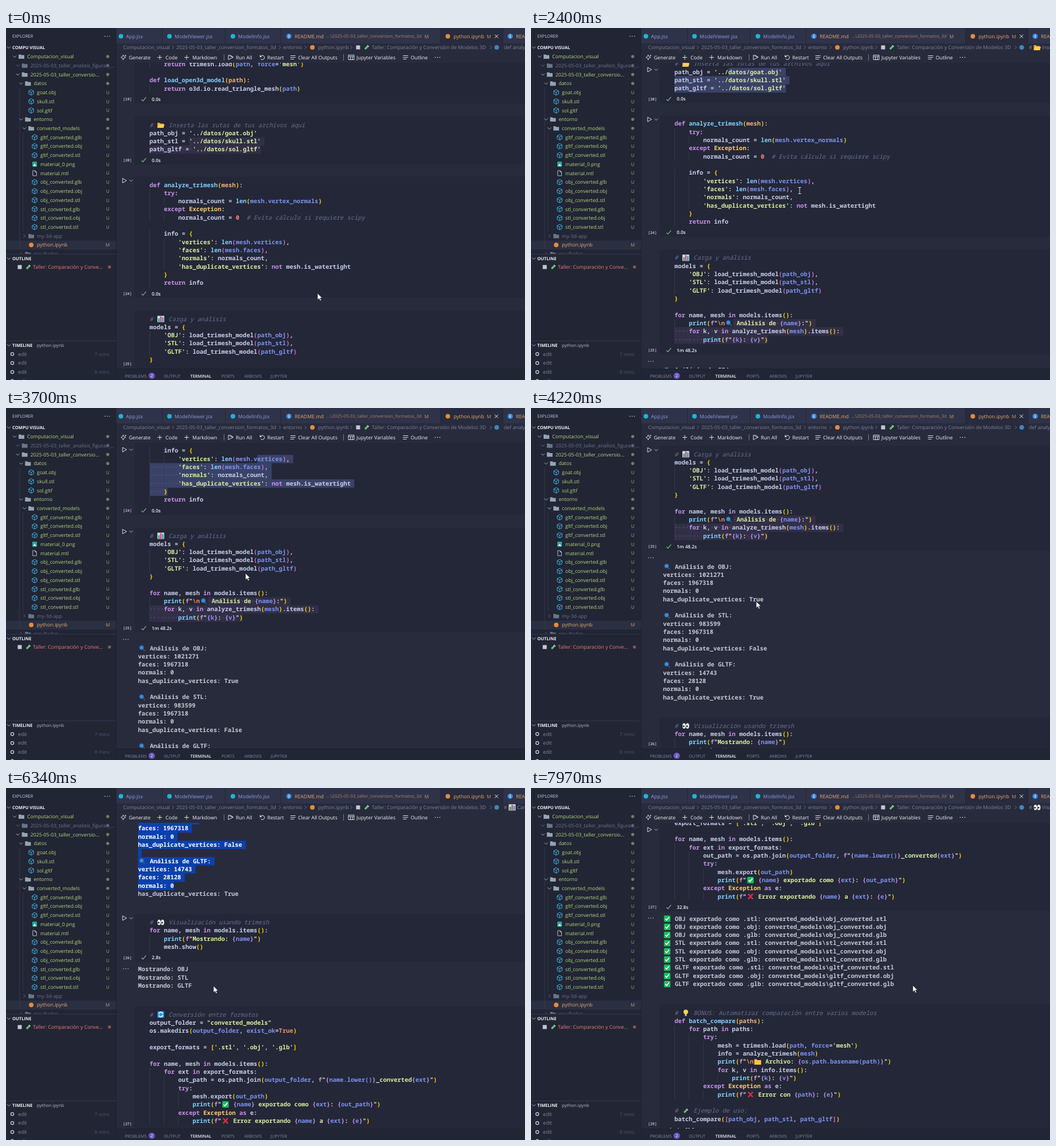
An HTML page that plays this animation: 908 by 617 pixels, repeating every 8 s.

```html
<!DOCTYPE html>
<html lang="es">
<head>
<meta charset="utf-8">
<title>Notebook</title>
<style>
html, body { margin: 0; width: 100%; height: 100%; overflow: hidden; background: #282b3c; }
svg { display: block; width: 908px; height: 617px; text-rendering: geometricPrecision; }
text { white-space: pre; font-family: "Open Sans", "Noto Sans", sans-serif; }
.code text { font: 600 10.48px "Noto Sans Mono", "DejaVu Sans Mono", monospace; }
.code .i { font-style: italic; font-weight: 500; }
.code .ui { font: 600 8.2px "Open Sans", sans-serif; }
.code .num { font: 600 6.5px "Noto Sans Mono", monospace; }
</style>
</head>
<body>
<svg id="stage" viewBox="0 0 908 617"></svg>
<script>
const CHAR = 6.288, LINE = 14.33, EMOJI = 14.5, CODE_X = 251, OUT_X = 231, NOTCH = 35.75, LOOP = 8000, HOLD = 100;
const C = {
  text: '#c6cce9', key: '#c792ea', fn: '#82cfff', str: '#d7eea0', arg: '#7b92f0', param: '#f0b084',
  note: '#676e95', num: '#f78c6c', type: '#ffcb6b', out: '#c6c8d2', green: '#b3d67d', orange: '#e2a86e',
  dim: '#6d728f', white: '#f0f1f8', cyan: '#3db4e6', line: '#3a3e55',
  pairs: ['#ffd700', '#da70d6', '#5aa8ff']
};

// ---------- drawing helpers ----------
const text = (x, y, s, fill = C.text, size = 8.75, extra = '') =>
  `<text x="${x}" y="${y + size * .36}" font-size="${size}" fill="${fill}" ${extra}>${s}</text>`;
const rect = (x, y, w, h, fill, extra = '') =>
  `<rect x="${x}" y="${y}" width="${w}" height="${h}" fill="${fill}" ${extra}/>`;
const dot = (x, y, r, fill, extra = '') => `<circle cx="${x}" cy="${y}" r="${r}" fill="${fill}" ${extra}/>`;
const path = (x, y, d, stroke, fill = 'none', w = 1) =>
  `<path transform="translate(${x} ${y})" d="${d}" stroke="${stroke}" fill="${fill}" stroke-width="${w}"/>`;
const down = (x, y, c = '#b9bccd') => path(x, y, 'M-3-1.5L0 1.5 3-1.5', c, 'none', .9);
const right = (x, y, c = C.dim) => path(x, y, 'M-1.5-3L1.5 0-1.5 3', c, 'none', .9);
const folder = (x, y, c = '#93a5b3') => path(x, y, 'M-5-3.6h4l1.2 1.2H5V4H-5z', 'none', c);
const cube = (x, y) => path(x, y, 'M0-4.8L4.2-2.5V2.5L0 4.8-4.2 2.5V-2.5zM-4.2-2.5L0 0 4.2-2.5M0 0V4.8', C.cyan);
const plus = (x, y) => path(x, y, 'M-4 0H4M0-4V4', C.white, 'none', .9);
const square = (x, y, c) => rect(x - 3.5, y - 3.5, 7, 7, c);
const info = (x, y) => dot(x, y, 4.6, '#3b8ee0') + rect(x - .6, y - 1, 1.2, 3.4, '#fff') + rect(x - .6, y - 2.8, 1.2, 1.2, '#fff');
const tube = (x, y) => path(x, y, 'M-3 3L3-3', '#62c46b', 'none', 3.2) + path(x, y, 'M1-4L4-1', '#dfe8e8');

const emoji = {
  '📂': (x, y) => path(x, y, 'M-6-4h4l1.5 1.5H5V5H-6z', 'none', '#e0a92e') + path(x, y, 'M-4-1H6.5L4.5 5H-6z', 'none', '#ffd054'),
  '📁': (x, y) => path(x, y, 'M-6-4.5h4l1.5 1.5H6V5H-6z', 'none', '#fcc43a'),
  '📊': (x, y) => rect(x - 6, y - 5.5, 12, 11, '#cfdbe4') + rect(x - 4.5, y - 1, 2.5, 6, '#2fa66a') + rect(x - 1.2, y - 4.5, 2.5, 9.5, '#e0475b') + rect(x + 2.2, y - 3, 2.5, 8, '#3b8ee0'),
  '🔍': (x, y) => path(x, y, 'M1.5 1.5L5 5', '#35506e', 'none', 2.2) + dot(x - 1, y - 1, 3.7, '#3a8fdc', 'stroke="#29598f" stroke-width="1.3"'),
  '👀': (x, y) => [-3, 3].map(d => `<ellipse cx="${x + d}" cy="${y}" rx="2.9" ry="4.8" fill="#f4f4f4"/>` + dot(x + d - .8, y + .5, 1.6, '#2a2a33')).join(''),
  '🔄': (x, y) => rect(x - 5.8, y - 5.8, 11.6, 11.6, '#2c9be8', 'rx="1.5"') + path(x, y, 'M-3-.5A3 3 0 0 1 3-1.5M3 .5A3 3 0 0 1-3 1.5', '#fff', 'none', 1.4),
  '✅': (x, y) => rect(x - 5.6, y - 5.6, 11.2, 11.2, '#16c160', 'rx="1.5"') + path(x, y, 'M-3.2 0L-1 2.6 3.4-2.8', '#fff', 'none', 1.6),
  '❌': (x, y) => path(x, y, 'M-4-4.5L4 4.5M4-4.5L-4 4.5', '#e5293e', 'none', 2.4),
  '💡': (x, y) => dot(x, y - 1.5, 4, '#ffd54a') + rect(x - 1.7, y + 2, 3.4, 3.6, '#b9bcc4'),
  '🧪': tube
};
const isEmoji = ch => ch in emoji;
const advance = s => [...s].reduce((w, ch) => w + (isEmoji(ch) ? EMOJI : CHAR), 0);

// Lays out coloured runs on the character grid, emoji being wider cells.
function layout(x, y, runs) {
  let svg = '';
  for (const [s, fill, cls = ''] of runs)
    for (const part of s.split(/([📂📁📊🔍👀🔄✅❌💡🧪])/u)) {
      if (isEmoji(part)) svg += emoji[part](x + EMOJI / 2, y);
      else if (part.trim()) svg += `<text class="${cls}" x="${x}" y="${y + 3.5}" fill="${fill}">${part}</text>`;
      x += advance(part);
    }
  return svg;
}

// ---------- syntax colours ----------
function highlight(src, stack) {
  const runs = [], isDef = src.startsWith('def');
  const token = /(#.*)|(f?"(?:\\.|[^"])*"|'[^']*')|\b(def|return|try|except|for|in|as|not)\b|\b(Exception)\b|\b(True|\d+)\b|([A-Za-z_][\w.]*)|(.)/gu;
  let prev = '';
  for (const [s, note, str, key, type, num, word] of src.matchAll(token)) {
    if (note) runs.push([s, C.note, 'i']);
    else if (str) {
      let inside = false;
      for (const p of s.split(/(^f(?=")|[{}]|\\n)/)) {
        if (!p) continue;
        const brace = p === '{' || p === '}';
        if (brace) inside = p === '{';
        runs.push([p, brace || p === 'f' ? C.key : p === '\\n' ? C.num : inside ? C.arg : C.str]);
      }
    }
    else if (key) runs.push([s, C.key]);
    else if (type) runs.push([s, C.type]);
    else if (num) runs.push([s, C.num]);
    else if (word) runs.push([s, prev === 'def' || /^(print|len)$/.test(s) ? C.fn
      : stack.includes('(') ? (isDef ? C.param : C.arg) : C.text]);
    else if ('([{'.includes(s)) { runs.push([s, C.pairs[stack.length % 3]]); stack.push(s); }
    else if (')]}'.includes(s)) { stack.pop(); runs.push([s, C.pairs[stack.length % 3]]); }
    else runs.push([s, C.text]);
    if (s !== ' ') prev = s;
  }
  return runs;
}

// ---------- notebook ----------
const report = (name, vertices, faces, dup) =>
  [`🔍 Análisis de ${name}:`, `vertices: ${vertices}`, `faces: ${faces}`, 'normals: 0', `has_duplicate_vertices: ${dup}`, ''];
const exported = ['OBJ', 'STL', 'GLTF'].flatMap(n => ['stl', 'obj', 'glb'].map(e =>
  `✅ ${n} exportado como .${e}: converted_models\\${n.toLowerCase()}_converted.${e}`));

const cells = [
  { n: 19, y: 49, time: '0.0s', code: String.raw`def load_trimesh_model(path):
    return trimesh.load(path, force='mesh')

def load_open3d_model(path):
    return o3d.io.read_triangle_mesh(path)` },
  { n: 20, y: 170, time: '0.0s', code: String.raw`# 📂 Inserta las rutas de tus archivos aquí
path_obj = '../datos/goat.obj'
path_stl = '../datos/skull.stl'
path_gltf = '../datos/sol.gltf'` },
  { n: 24, y: 275, time: '0.0s', code: String.raw`def analyze_trimesh(mesh):
    try:
        normals_count = len(mesh.vertex_normals)
    except Exception:
        normals_count = 0  # Evita cálculo si requiere scipy

    info = {
        'vertices': len(mesh.vertices),
        'faces': len(mesh.faces),
        'normals': normals_count,
        'has_duplicate_vertices': not mesh.is_watertight
    }
    return info` },
  { n: 25, y: 510, time: '1m 48.2s', outY: 707, dotsY: 691.5,
    out: [...report('OBJ', 1021271, 1967318, 'True'), ...report('STL', 983599, 1967318, 'False'), ...report('GLTF', 14743, 28128, 'True')],
    code: String.raw`# 📊 Carga y análisis
models = {
    'OBJ': load_trimesh_model(path_obj),
    'STL': load_trimesh_model(path_stl),
    'GLTF': load_trimesh_model(path_gltf)
}

for name, mesh in models.items():
    print(f"\n🔍 Análisis de {name}:")
    for k, v in analyze_trimesh(mesh).items():
        print(f"{k}: {v}")` },
  { n: 26, y: 986.3, time: '2.8s', outY: 1068.5, dotsY: 1067.5,
    out: ['OBJ', 'STL', 'GLTF'].map(n => 'Mostrando: ' + n),
    code: String.raw`# 👀 Visualización usando trimesh
for name, mesh in models.items():
    print(f"Mostrando: {name}")
    mesh.show()` },
  { n: 27, y: 1147.8, time: '32.8s', outY: 1373, dotsY: 1372, out: exported,
    code: String.raw`# 🔄 Conversión entre formatos
output_folder = "converted_models"
os.makedirs(output_folder, exist_ok=True)

export_formats = ['.stl', '.obj', '.glb']

for name, mesh in models.items():
    for ext in export_formats:
        out_path = os.path.join(output_folder, f"{name.lower()}_converted{ext}")
        try:
            mesh.export(out_path)
            print(f"✅ {name} exportado como {ext}: {out_path}")
        except Exception as e:
            print(f"❌ Error exportando {name} a {ext}: {e}")` },
  { n: 29, y: 1538, time: '1m 50.8s', code: String.raw`# 💡 BONUS: Automatizar comparación entre varios modelos
def batch_compare(paths):
    for path in paths:
        try:
            mesh = trimesh.load(path, force='mesh')
            info = analyze_trimesh(mesh)
            print(f"\n📁 Archivo: {os.path.basename(path)}")
            for k, v in info.items():
                print(f"{k}: {v}")
        except Exception as e:
            print(f"❌ Error con {path}: {e}")

# 🧪 Ejemplo de uso:
batch_compare([path_obj, path_stl, path_gltf])` }
];

function drawCell(cell) {
  cell.lines = cell.code.split('\n');
  cell.statusY = cell.y + (cell.lines.length - 1) * LINE + 18.6;
  cell.end = cell.out ? cell.outY + cell.out.length * LINE + 14 : cell.statusY + 12;
  const stack = [];
  let svg = rect(225, cell.y - 14.5, 683, cell.statusY - cell.y + 22, '#242737') + `<g id="sel${cell.n}"></g>`;
  cell.lines.forEach((src, i) => {
    const y = cell.y + i * LINE, indent = src.search(/\S/);
    for (let col = 0; col < indent; col += 4) svg += rect(CODE_X + col * CHAR, y - LINE / 2, .8, LINE, C.line);
    svg += layout(CODE_X, y, highlight(src, stack));
  });
  svg += path(241, cell.statusY, 'M-4 .5L-1.5 3 4-3.5', '#7fc98a', 'none', 1.1) +
    `<text class="ui" x="255" y="${cell.statusY + 3}" fill="${C.white}">${cell.time}</text>` +
    `<text class="num" id="num${cell.n}" x="204.5" fill="#b4b8cb">[${cell.n}]</text>`;
  if (cell.out) {
    svg += [205.5, 209.5, 213.5].map(x => dot(x, cell.dotsY, .8, C.text)).join('');
    cell.out.forEach((s, i) => svg += layout(OUT_X, cell.outY + i * LINE, [[s, C.out]]));
  }
  return svg + `<g id="run${cell.n}">${path(207, 0, 'M-3-4L4 0-3 4z', C.white, 'none', .9)}${down(219, 0)}</g>`;
}

// ---------- window around the notebook ----------
function sidebar() {
  let svg = rect(0, 0, 193, 617, '#222534') + rect(0, 372.5, 193, 15.7, '#2b2f42') +
    text(11, 14.5, 'EXPLORER', C.text, 7.6) + [173, 177, 181].map(x => dot(x, 14.5, .8, C.text)).join('') +
    down(5, 34) + text(11, 34, 'COMPU VISUAL', C.white, 7.6, 'font-weight="700"') +
    rect(23.5, 104, .8, 284, C.line) + rect(29.5, 183, .8, 173, C.line);
  const models = ['gltf', 'obj', 'stl'].map(n => ['glb', 'obj', 'stl'].map(e => `3 ${n}_converted.${e}`));
  const rows = ['0 /Computacion_visual', '1 -2025-05-03_taller_analisis_figuras_...', '1 /2025-05-03_taller_conversio...',
    '2 /datos', '3 goat.obj', '3 skull.stl', '3 sol.gltf', '2 /entorno', '3 /converted_models', ...models[0],
    '3 material_0.png', '3 material.mtl', ...models[1], ...models[2], '3 -my-3d-app', '3 python.ipynb', '2 -resultados'];
  let open = false;
  rows.forEach((row, i) => {
    const y = 50 + i * 15.73, kind = row[2], isDir = '/-'.includes(kind), name = row.slice(isDir ? 3 : 2);
    let x = 37 + row[0] * 5.7;
    if (name === 'my-3d-app') open = false;
    if (open) x += 6;
    if (isDir) {
      const muted = kind === '-';
      svg += (muted && i > 1 ? right : down)(x - 22, y, muted ? C.dim : undefined) + folder(x - 10, y, muted ? '#66788a' : undefined) +
        text(x, y, name, muted ? C.dim : C.green) + (i < 20 ? dot(178, y, 2.7, muted ? '#5d6270' : '#6f8060') : '');
    } else {
      const icon = /ipynb/.test(name) ? dot(x - 10, y, 4, '#e38b3c')
        : /png/.test(name) ? rect(x - 14, y - 4.5, 8, 9, '#2ba99b', 'rx="1"') + path(x - 10, y, 'M-3 3L0-1 3 3z', 'none', '#d6f3ef')
        : /mtl/.test(name) ? path(x - 10, y, 'M-3.3-4.5H1L3.3-2V4.5H-3.3zM1-4.5V-2H3.3', '#b6bccd') : cube(x - 10, y);
      const edited = /ipynb/.test(name), c = edited ? C.orange : C.green;
      svg += icon + text(x, y, name, c) + text(178, y, edited ? 'M' : 'U', c, 8.2, 'text-anchor="middle" opacity=".8"');
    }
    if (name === 'converted_models') open = true;
  });
  svg += rect(0, 395.5, 193, 222, '#222534') + rect(0, 396, 193, .8, C.line) + rect(0, 548, 193, .8, C.line) +
    down(5, 404) + text(11, 404, 'OUTLINE', C.white, 7.6, 'font-weight="700"') +
    square(24, 419, '#c4c7d4') + tube(39, 419) + text(47, 419, 'Taller: Comparación y Conve...', '#f07a70') + dot(181, 419, 2.7, '#85574f') +
    down(5, 556) + text(11, 556, 'TIMELINE', C.white, 7.6, 'font-weight="700"') + text(54, 556, 'python.ipynb', '#b4b8c8', 7.8);
  ['7 mins', '', '8 mins', ''].forEach((age, i) => {
    const y = 571.5 + i * 15.73;
    svg += dot(11, y, 2.6, 'none', 'stroke="#d5d8e6" stroke-width="1.2"') + text(21, y, 'edit', '#83889f') +
      text(181, y, age, '#50556d', 8.4, 'text-anchor="end"');
  });
  return svg + rect(192.5, 0, .8, 617, '#1d202d');
}

function header() {
  let svg = rect(193, 0, 715, 27, '#2f3349') + rect(760, 0, 109, 27, '#282b3d') +
    [273, 383, 480, 760, 869].map(x => rect(x, 0, .8, 27, '#222534')).join('');
  [[201, 'App.jsx'], [286, 'ModelViewer.jsx'], [397, 'ModelInfo.jsx']].forEach(([x, s]) =>
    svg += dot(x, 14.5, 4, '#1fb4d8') + text(x + 9, 14.5, s, '#8d9be0'));
  svg += info(495, 14.5) + text(505, 14.5, 'README.md', C.orange) +
    text(561, 14.5, '...\\2025-05-03_taller_conversion_formatos_3d', '#a68466', 7.87) + text(732, 14.5, 'M', '#c3966a', 8.4) +
    dot(773, 14.5, 4, '#e38b3c') + text(783, 14.5, 'python.ipynb', C.orange) + text(841, 14.5, 'M', '#c3966a', 8.4) +
    path(858, 14.5, 'M-3-3L3 3M3-3L-3 3', C.white) + info(882, 14.5) + text(892, 14.5, 'README.md', C.orange);
  const crumb = '#7e839c';
  svg += text(205, 34, 'Computacion_visual', crumb) + text(298, 34, '2025-05-03_taller_conversion_formatos_3d', crumb) +
    text(485, 34, 'entorno', crumb) + dot(536, 34, 4, '#e38b3c') + text(546, 34, 'python.ipynb', crumb) +
    square(616, 34, '#c4c7d4') + tube(631, 34) + text(640, 34, 'Taller: Comparación y Conversión de Modelos 3D', crumb) +
    [292, 479, 524, 604, 848].map(x => right(x, 34)).join('') + dot(858.5, 34, 4, '#3f86bd') + '<g id="crumb"></g>';
  const label = (x, s) => text(x, 51.5, s, C.white);
  const list = x => path(x, 51.5, 'M-4.5-3H4.5M-4.5 0H4.5M-4.5 3H2', C.white, 'none', .9);
  return svg + path(206, 51.5, 'M-1-4.5L.3-1.3 3.5 0 .3 1.3-1 4.5-2.3 1.3-5 0-2.3-1.3zM3-4.5V-2M1.8-3.2H4.3', C.white, 'none', .8) +
    label(215, 'Generate') + plus(269, 51.5) + label(279, 'Code') + plus(316, 51.5) + label(326, 'Markdown') +
    rect(381, 46, .8, 11, '#8b90a8') + path(393, 51.5, 'M-4-4L4 0-4 4zM-1.5-4.5L5 0', C.white, 'none', .9) + label(402, 'Run All') +
    path(448.5, 51.5, 'M-3.5-1A3.7 3.7 0 1 1-3 2.4M-4-4V-1H-1', C.white) + label(457, 'Restart') +
    list(502) + label(511, 'Clear All Outputs') + rect(590, 46, .8, 11, '#8b90a8') +
    path(604, 51.5, 'M-5-4H5V4H-5zM-5-1.5H5M-1.5-1.5V4M2-1.5V4', C.white, 'none', .9) + label(613, 'Jupyter Variables') +
    list(699) + label(708, 'Outline') + [751, 755, 759].map(x => dot(x, 51.5, .8, C.white)).join('');
}

function panel() {
  const tabs = [[208, 'PROBLEMS'], [276, 'OUTPUT'], [322.5, 'TERMINAL'], [377, 'PORTS'], [417, 'ARBOVIS'], [463, 'JUPYTER']];
  return rect(193, 597, 715, 20, '#222534') + rect(193, 597, 715, .8, '#1d202d') +
    tabs.map(([x, s]) => text(x, 610.5, s, s === 'TERMINAL' ? C.white : '#8287a0', 7.4, s === 'TERMINAL' ? 'font-weight="600"' : '')).join('') +
    dot(255, 609.5, 5.6, '#6c55c4') + text(255, 609.5, '2', '#fff', 7.2, 'text-anchor="middle"');
}

const stage = document.getElementById('stage');
stage.innerHTML = '<clipPath id="view"><rect x="193" y="61" width="715" height="536"/></clipPath>' +
  rect(0, 0, 908, 617, '#282b3c') +
  `<g class="code" clip-path="url(#view)"><g id="scroll">${cells.map(drawCell).join('')}<g id="selOut"></g></g></g>` +
  sidebar() + header() + panel() +
  `<g id="arrow">${path(0, 0, 'M0 0V11.5L2.7 9 4.6 13.2 6.5 12.3 4.7 8.3H8.2z', '#222', '#fff', .7)}</g>` +
  `<g id="beam">${path(0, 0, 'M-2.5-5.5H2.5M0-5.5V5.5M-2.5 5.5H2.5', '#d8dae4', 'none', 1)}</g>`;
const $ = id => document.getElementById(id);

// ---------- timeline ----------
const scrollKeys = [[0, 0], [1850, 0], [2200, 3], [2950, 3], [3180, 6], [3500, 6], [4100, 12], [4320, 12], [4400, 13],
  [5120, 13], [5600, 21], [6840, 21], [7900, 32]];
// time, x, y, text cursor
const mouseKeys = [[0, 545, 465, 0], [100, 545, 465, 0], [400, 585, 370, 0], [880, 440, 205, 1], [1080, 446, 212, 1],
  [1500, 345, 184, 1], [1700, 380, 250, 1], [2300, 470, 285, 1], [2450, 470, 285, 1], [2680, 439, 268, 1],
  [2920, 284, 326, 1], [3180, 429, 270, 0], [3500, 429, 270, 0], [4200, 394, 339, 0], [4500, 292, 456, 1],
  [4900, 284, 242, 1], [5080, 312, 268, 1], [5920, 312, 268, 0], [6300, 363, 347, 0], [6420, 363, 347, 0],
  [6640, 350, 290, 0], [6800, 340, 265, 1], [7000, 400, 285, 0], [7900, 668, 346, 0]];
const focusKeys = [[0, 24], [1080, 20], [2680, 24], [5250, 25], [6800, 26]];
const crumbs = { 24: 'def analyze_trimesh', 20: '📂Inserta las rutas', 25: '📊Carga y análisis', 26: '👀Visualización' };

function sample(keys, t) {
  const i = keys.findLastIndex(k => k[0] <= t), a = keys[i], b = keys[i + 1] || a;
  const u = b === a ? 0 : (t - a[0]) / (b[0] - a[0]);
  return a.map((v, j) => v + (b[j] - v) * u);
}
const held = (keys, t) => keys.findLast(k => k[0] <= t);

function setHtml(id, html) {
  const node = $(id);
  if (node.last !== html) node.innerHTML = node.last = html;
}

// Paints a selection between two [line, column] points, in either order.
function select(id, lines, x0, y0, a, b, fill, front) {
  if (a[0] > b[0] || (a[0] === b[0] && a[1] > b[1])) [a, b] = [b, a];
  let svg = '';
  for (let i = a[0]; i <= b[0]; i++) {
    const chars = [...lines[i]], from = i === a[0] ? a[1] : 0, to = i === b[0] ? b[1] : chars.length;
    const x = x0 + advance(chars.slice(0, from).join('')), y = y0 + i * LINE, part = chars.slice(from, to);
    const spaces = part.map(ch => ch === ' ' ? '·' : isEmoji(ch) ? ch : '\u00a0').join('');
    svg += rect(x, y - LINE / 2, advance(part.join('')) + (i < b[0] ? CHAR : 0), LINE + .2, fill) +
      layout(x, y, [front ? [part.join(''), '#fff'] : [spaces, '#555a7b']]);
  }
  setHtml(id, svg);
}

function drawSelections(t, mx, my) {
  const dim = '#322f47', bright = '#3b4268', blue = '#0b41ad';
  const point = (lines, x0, y0) => {
    const row = Math.max(0, Math.min(lines.length - 1, Math.round((my - y0) / LINE)));
    return [row, Math.max(0, Math.min([...lines[row]].length, Math.round((mx - x0) / CHAR)))];
  };
  const [, paths, analyze, load] = cells;
  const code = (cell, a, b, fill) => select('sel' + cell.n, cell.lines, CODE_X, cell.y, a, b, fill);

  const pathStart = t < 1080 ? [2, 11] : t < 1500 ? point(paths.lines, CODE_X, paths.y) : [1, 15];
  code(paths, pathStart, [3, 31], t >= 1080 && t < 2680 ? bright : dim);

  if (t < 2680) setHtml('sel24', '');
  else code(analyze, [7, 30], t < 2920 ? point(analyze.lines, CODE_X, analyze.y) : [11, 5], t < 4310 ? bright : dim);

  code(load, [8, 15], [10, 26], t < 4500 ? dim : '#483e70');

  if (t < 4500 || t >= 6500) setHtml('selOut', '');
  else select('selOut', load.out, OUT_X, load.outY, t < 4900 ? point(load.out, OUT_X, load.outY) : [0, 7], [15, 10], blue, true);
}

function drawCrumb(label) {
  const [first, ...rest] = label, grey = '#7e839c';
  setHtml('crumb', isEmoji(first)
    ? text(871, 34, '#', grey) + emoji[first](885.5, 34) + text(894, 34, rest.join(''), grey)
    : text(871, 34, label, grey));
}

function draw(t) {
  const s = Math.round(sample(scrollKeys, t)[1]) * NOTCH;
  const [, x, y] = sample(mouseKeys, t), beam = held(mouseKeys, t)[3], focus = held(focusKeys, t)[1];
  $('scroll').setAttribute('transform', `translate(0 ${-s})`);
  for (const cell of cells) {
    const hover = y + s >= cell.y - 15 && y + s < cell.end;
    const active = focus === cell.n && cell.statusY >= s + 73;
    $('num' + cell.n).setAttribute('y', Math.max(cell.y, Math.min(cell.statusY, 589 + s)) + 2.4);
    const run = $('run' + cell.n);
    run.setAttribute('visibility', hover || active ? 'visible' : 'hidden');
    run.setAttribute('transform', `translate(0 ${Math.max(cell.y - 7.5, Math.min(cell.end - 15, 73 + s))})`);
  }
  drawSelections(t, x, y + s);
  drawCrumb(crumbs[focus]);
  for (const [id, on] of [['arrow', !beam], ['beam', beam]]) {
    $(id).setAttribute('visibility', on ? 'visible' : 'hidden');
    $(id).setAttribute('transform', `translate(${x} ${y})`);
  }
}

const start = performance.now();
(function tick() {
  const t = (performance.now() - start) % LOOP;
  draw(Math.floor(t / HOLD) * HOLD);
  requestAnimationFrame(tick);
})();
</script>
</body>
</html>
```
